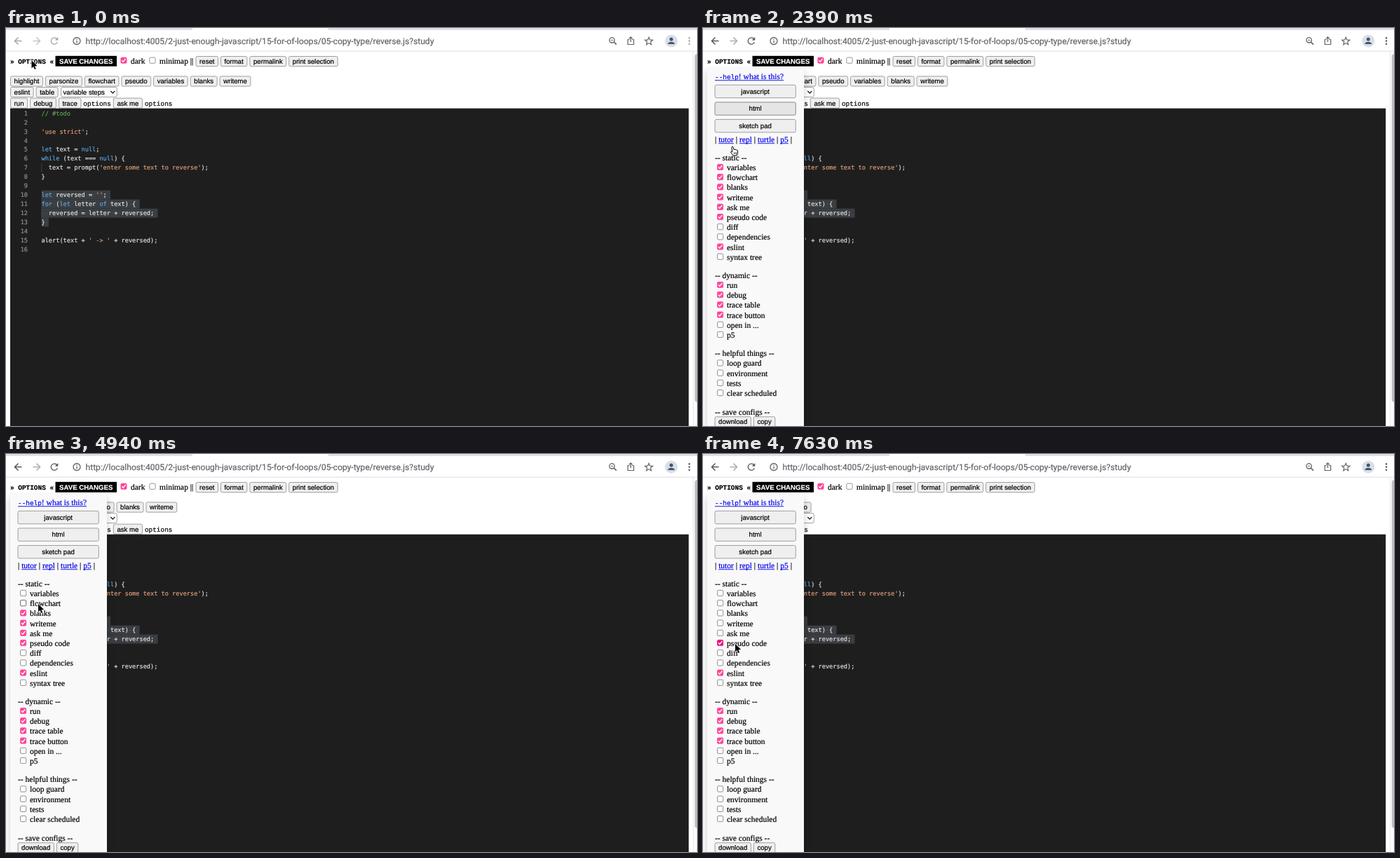
These frames come from a looping animation (986x568 px, 8000 ms). An HTML page with a canvas:

```html
<!DOCTYPE html>
<html lang="en">
<head>
<meta charset="utf-8">
<title>Study options</title>
<style>
html, body { margin: 0; width: 100%; height: 100%; overflow: hidden; background: #fff; }
canvas { display: block; width: 986px; height: 568px; }
</style>
</head>
<body>
<canvas id="stage"></canvas>
<script>
const W = 986, H = 568, LOOP = 8000;
const stage = document.getElementById('stage');
const dpr = window.devicePixelRatio || 1;
stage.width = W * dpr;
stage.height = H * dpr;
const c = stage.getContext('2d');

const SANS = '9.65px "Liberation Sans", Arial, sans-serif';
const SERIF = '11.5px "Liberation Serif", "Times New Roman", serif';
const MONO = '9.42px "Liberation Mono", "Courier New", monospace';
const CODE = '8.62px "DejaVu Sans Mono", monospace';
const URL_FONT = '12.12px Roboto, sans-serif';
const GAP = 2.9, PAD = 11.2, CHAR = 5.19, LINE = 12.97;
const PINK = '#ff4499', PINK_HOVER = '#f0107e', LINK = '#0000ee';

// start time, pointer, x, y, hovered item
const POINTER = [
  [0, 'arrow', 36.5, 46, ''],
  [1190, 'beam', 33, 47, ''],
  [1630, 'arrow', 35, 57, ''],
  [1780, 'hand', 37, 68, ''],
  [1930, 'arrow', 39, 87, 'javascript'],
  [2090, 'arrow', 40, 98, 'javascript'],
  [2240, 'arrow', 42, 115, 'html'],
  [2390, 'hand', 43, 169, 'html'],
  [2540, 'beam', 45, 188, ''],
  [2690, 'arrow', 45, 193, 'variables'],
  [2840, 'arrow', 46, 195, 'variables'],
  [2990, 'arrow', 46, 197, 'variables'],
  [4340, 'arrow', 46, 204, 'variables'],
  [4490, 'arrow', 46, 214, 'flowchart'],
  [5240, 'arrow', 46, 222, 'blanks'],
  [5390, 'arrow', 46, 231, 'blanks'],
  [5990, 'arrow', 46, 234, 'blanks'],
  [6140, 'arrow', 46, 238, 'writeme'],
  [6740, 'arrow', 46, 249, 'ask me'],
  [6890, 'arrow', 46, 258, 'ask me'],
  [7480, 'arrow', 46, 265, 'pseudo code'],
  [7630, 'arrow', 46, 271, 'pseudo code']
];
const UNCHECK = { variables: 3890, flowchart: 4940, blanks: 5840, writeme: 6590, 'ask me': 7330 };
const FOCUS = 440, OPEN = 1340;

const GROUPS = [
  ['static', 185, 199, '+variables +flowchart +blanks +writeme +ask me +pseudo code -diff -dependencies +eslint -syntax tree'],
  ['dynamic', 353, 367, '+run +debug +trace table +trace button -open in ... -p5'],
  ['helpful things', 464.5, 478.5, '-loop guard -environment -tests -clear scheduled'],
  ['save configs', 548, 0, '']
];

// colour keys: k keyword, s string, c comment, p plain
const TINT = { k: '#5ba3e0', s: '#dc9c7c', c: '#62a04f', p: '#e2e2e2' };
const SOURCE = [
  'c// #todo', '', "s'use strict'|p;", '',
  'klet|p text = |knull|p;',
  'kwhile|p (text === |knull|p) {',
  "p  text = prompt(|s'enter some text to reverse'|p);",
  'p}', '',
  "klet|p reversed = |s''|p;",
  'kfor|p (|klet|p letter |kof|p text) {',
  'p  reversed = letter + reversed;',
  'p}', '',
  "palert(text + |s' -> '|p + reversed);", ''
].map(line => line ? line.split('|') : []);

// a hairline outline gives the slightly heavy text smoothing
function text(s, x, y, font, color = '#000', align = 'left') {
  c.font = font;
  c.fillStyle = c.strokeStyle = color;
  c.textAlign = align;
  c.lineWidth = 0.2;
  c.fillText(s, x, y);
  c.strokeText(s, x, y);
  return c.measureText(s).width;
}

function rect(x, y, w, h, color) {
  c.fillStyle = color;
  c.fillRect(x, y, w, h);
}

function box(x, y, w, h, r, fill, border) {
  c.beginPath();
  c.roundRect(x + 0.5, y + 0.5, w - 1, h - 1, r);
  c.fillStyle = fill;
  c.fill();
  c.strokeStyle = border;
  c.lineWidth = 0.8;
  c.stroke();
}

function line(points, color, width = 1.4, close = false) {
  c.beginPath();
  points.forEach(([x, y]) => c.lineTo(x, y));
  if (close) c.closePath();
  c.strokeStyle = color;
  c.lineWidth = width;
  c.stroke();
}

function disc(x, y, r, color) {
  c.beginPath();
  c.arc(x, y, r, 0, 7);
  c.fillStyle = color;
  c.fill();
}

function ring(x, y, r, color, from = 0, to = Math.PI * 2) {
  c.beginPath();
  c.arc(x, y, r, from, to);
  c.strokeStyle = color;
  c.lineWidth = 1.3;
  c.stroke();
}

function button(label, x, y, w, h, hover) {
  box(x, y, w, h, 2, hover ? '#e5e5e5' : '#efefef', hover ? '#737373' : '#8a8a8a');
  text(label, x + w / 2, y + h / 2 + 3.3, SANS, '#000', 'center');
}

// lays buttons out side by side; a leading "=" marks plain monospace text
function row(labels, x, y) {
  for (const label of labels) {
    if (label[0] === '=') {
      x += text(label.slice(1), x, y + 11, MONO) + GAP;
      continue;
    }
    c.font = SANS;
    const w = c.measureText(label).width + PAD;
    button(label, x, y, w, 15.2);
    x += w + GAP;
  }
}

function checkbox(x, y, on, hover) {
  const fill = on ? (hover ? PINK_HOVER : PINK) : '#fff';
  box(x - 4.6, y - 4.6, 9.2, 9.2, 1.5, fill, on ? fill : hover ? '#484848' : '#767676');
  if (on) line([[x - 2.6, y + 0.1], [x - 0.8, y + 2], [x + 2.7, y - 2.3]], '#fff', 1.4);
}

function link(s, x, y, font = SERIF) {
  const w = text(s, x, y, font, LINK);
  rect(x, y + 1.3, w, 0.9, LINK);
  return w;
}

function backArrow(x, y, dir, color) {
  line([[x - 5 * dir, y], [x + 5 * dir, y]], color, 1.5);
  line([[x, y - 5], [x - 5 * dir, y], [x, y + 5]], color, 1.5);
}

function browser(active) {
  const ink = active ? '#54575b' : '#a3a6a9', icon = '#5f6368';
  rect(0, 0, W, 3, '#dee1e6');
  rect(266, 0, 194, 3, '#fff');
  rect(0, 32.5, W, 1, '#dcdee1');
  backArrow(17.5, 18.5, 1, ink);
  backArrow(43.5, 18.5, -1, active ? '#a9acaf' : '#c4c6c8');
  ring(69, 18.5, 4.7, ink, 0.35, 5.5);
  c.beginPath();
  c.moveTo(74.3, 13);
  c.lineTo(74.3, 17.6);
  c.lineTo(69.7, 17.6);
  c.fillStyle = ink;
  c.fill();

  ring(101, 18.5, 5, icon);
  rect(100.4, 17.8, 1.3, 3.4, icon);
  rect(100.4, 15.5, 1.3, 1.3, icon);
  text('http://localhost:4005/2-just-enough-javascript/15-for-of-loops/05-copy-type/reverse.js?study',
    113.5, 22.7, URL_FONT, icon);

  ring(864.7, 17.3, 3.7, icon);
  line([[867.4, 20], [871, 23.6]], icon, 1.7);
  line([[863, 17.3], [866.4, 17.3]], icon, 1);
  line([[889.5, 16.5], [887.3, 16.5], [887.3, 23.5], [895.7, 23.5], [895.7, 16.5], [893.5, 16.5]], icon, 1.2);
  line([[891.5, 20], [891.5, 13]], icon, 1.2);
  line([[889, 15.2], [891.5, 12.8], [894, 15.2]], icon, 1.2);
  const star = Array.from({ length: 10 }, (_, i) => {
    const r = i % 2 ? 2.6 : 5.8, a = i * Math.PI / 5;
    return [917.3 + r * Math.sin(a), 19 - r * Math.cos(a)];
  });
  line(star, icon, 1.2, true);

  disc(949.3, 18.5, 9, '#d9dfe9');
  disc(949.3, 16, 2.5, '#46546b');
  c.beginPath();
  c.ellipse(949.3, 23, 5, 3.2, 0, Math.PI, 0);
  c.fill();
  for (const y of [14.2, 18.5, 22.8]) disc(975, y, 1.25, ink);
}

function header() {
  text('» OPTIONS «', 6, 51, 'bold ' + MONO);
  rect(70.5, 39.8, 87.5, 14.9, '#000');
  text('SAVE CHANGES', 114.2, 51, 'bold ' + SANS, '#fff', 'center');
  checkbox(168, 46.2, true);
  text('dark', 178, 51, SERIF);
  checkbox(209, 46.2, false);
  text('minimap ||', 219, 51, SERIF);
  row(['reset', 'format', 'permalink', 'print selection'], 270.5, 40);
}

function tools(isOn) {
  const optional = ['flowchart', 'pseudo', 'variables', 'blanks', 'writeme'];
  row(['highlight', 'parsonize', ...optional.filter(isOn)], 6, 68.4);
  row(['eslint', 'table'], 6, 84);
  box(78, 84, 80.8, 15, 2.5, '#fff', '#8a8a8a');
  text('variable steps', 81.5, 94.8, SANS);
  line([[149.3, 90], [152.3, 93], [155.3, 90]], '#222', 1.3);
  row(['run', 'debug', 'trace', '=options', ...(isOn('ask me') ? ['ask me', '=options'] : [])], 6, 99.6);
}

function editor() {
  rect(6, 114.7, 968.2, H, '#1e1e1e');
  SOURCE.forEach((parts, i) => {
    const top = 115 + i * LINE, base = top + 9.6;
    const chars = parts.map(p => p.slice(1)).join('');
    const selected = i >= 9 && i <= 12;
    if (selected) rect(50.5, top, (chars.length + 1) * CHAR, LINE, '#3a3d41');
    if (chars.startsWith('  ')) rect(50.5, top, 0.8, LINE, '#484848');
    text(String(i + 1), 31, base, CODE, '#8f8f8f', 'right');
    let x = 50.5;
    for (const p of parts) x += text(p.slice(1), x, base, CODE, TINT[p[0]]);
    if (!selected) return;
    [...chars].forEach((ch, k) => {
      if (ch === ' ') disc(50.5 + (k + 0.5) * CHAR, top + 6.6, 0.6, 'rgba(227,228,226,.2)');
    });
  });
}

function scrollbar() {
  rect(980, 33.5, 6, H, '#fafafa');
  rect(980, 33.5, 0.8, H, '#e6e6e6');
  c.beginPath();
  c.roundRect(982.8, 37, 8, 497, 4);
  c.fillStyle = '#bfbfbf';
  c.fill();
}

function menu(isOn, hover) {
  c.save();
  c.beginPath();
  c.rect(0, 55, W, H);
  c.clip();
  c.shadowColor = 'rgba(0,0,0,.2)';
  c.shadowBlur = 11 * dpr;
  c.shadowOffsetY = 6 * dpr;
  rect(6, 55, 138, H, '#f9f9f9');
  c.restore();

  const w = link('--help', 17, 73, MONO);
  link('! what is this?', 17 + w, 73);
  ['javascript', 'html', 'sketch pad'].forEach((s, i) =>
    button(s, 16.5, 80.8 + i * 24.6, 116.3, 19.4, s === hover));

  let x = 17;
  for (const s of ['tutor', 'repl', 'turtle', 'p5']) {
    x += text('| ', x, 163, SERIF);
    x += link(s, x, 163) + GAP;
  }
  text('|', x, 163, SERIF);

  for (const [title, titleY, first, items] of GROUPS) {
    text(`-- ${title} --`, 17, titleY + 3.9, SERIF);
    if (!items) continue;
    items.split(/ (?=[+-])/).forEach((item, i) => {
      const name = item.slice(1), y = first + i * 14.2;
      checkbox(24.6, y - 0.5, item[0] === '+' && isOn(name), name === hover);
      text(name, 34, y + 3.9, SERIF);
    });
  }
  row(['download', 'copy'], 16.5, 554.3);
}

const SHAPES = {
  arrow() {
    c.beginPath();
    [[0, 0], [0, 11.4], [2.6, 9], [4.4, 13], [6.2, 12.2], [4.5, 8.4], [8.1, 8.1]]
      .forEach(([x, y]) => c.lineTo(x, y));
    c.closePath();
    c.lineJoin = 'round';
    c.strokeStyle = '#fff';
    c.lineWidth = 1.6;
    c.stroke();
    c.fillStyle = '#000';
    c.fill();
  },
  beam() {
    for (const [color, width] of [['#fff', 2.2], ['#000', 1.1]]) {
      line([[0, -5], [0, 5]], color, width);
      line([[-2.8, -6], [-1, -6], [0, -5], [1, -6], [2.8, -6]], color, width);
      line([[-2.8, 6], [-1, 6], [0, 5], [1, 6], [2.8, 6]], color, width);
    }
  },
  hand() {
    c.beginPath();
    c.moveTo(-1.2, 8);
    c.lineTo(-2.2, 1.3);
    c.quadraticCurveTo(-1, -0.8, 0, 1);
    c.lineTo(1, 4.6);
    c.quadraticCurveTo(2.2, 3.4, 3, 4.8);
    c.quadraticCurveTo(4.4, 3.8, 5, 5.4);
    c.quadraticCurveTo(6.6, 4.8, 6.6, 6.6);
    c.quadraticCurveTo(6.8, 10, 5.2, 13);
    c.lineTo(0, 13);
    c.quadraticCurveTo(-1.6, 10.4, -3.6, 8.2);
    c.quadraticCurveTo(-3.2, 6.4, -1.2, 8);
    c.closePath();
    c.fillStyle = '#fff';
    c.fill();
    c.strokeStyle = '#000';
    c.lineWidth = 1;
    c.stroke();
    for (const x of [1.4, 3, 4.6]) line([[x, 8.4], [x, 11]], '#000', 0.7);
  }
};

function draw(t) {
  const [, shape, x, y, hover] = POINTER.findLast(p => p[0] <= t);
  const isOn = name => !(t >= UNCHECK[name]);
  c.setTransform(dpr, 0, 0, dpr, 0, 0);
  c.textRendering = 'geometricPrecision';
  rect(0, 0, W, H, '#fff');
  browser(t >= FOCUS);
  header();
  tools(isOn);
  editor();
  scrollbar();
  if (t >= OPEN) menu(isOn, hover);
  c.save();
  c.translate(x, y);
  SHAPES[shape]();
  c.restore();
}

const start = performance.now();
function tick(now) {
  draw(Math.max(0, now - start) % LOOP);
  requestAnimationFrame(tick);
}
draw(0);
requestAnimationFrame(tick);
</script>
</body>
</html>
```
